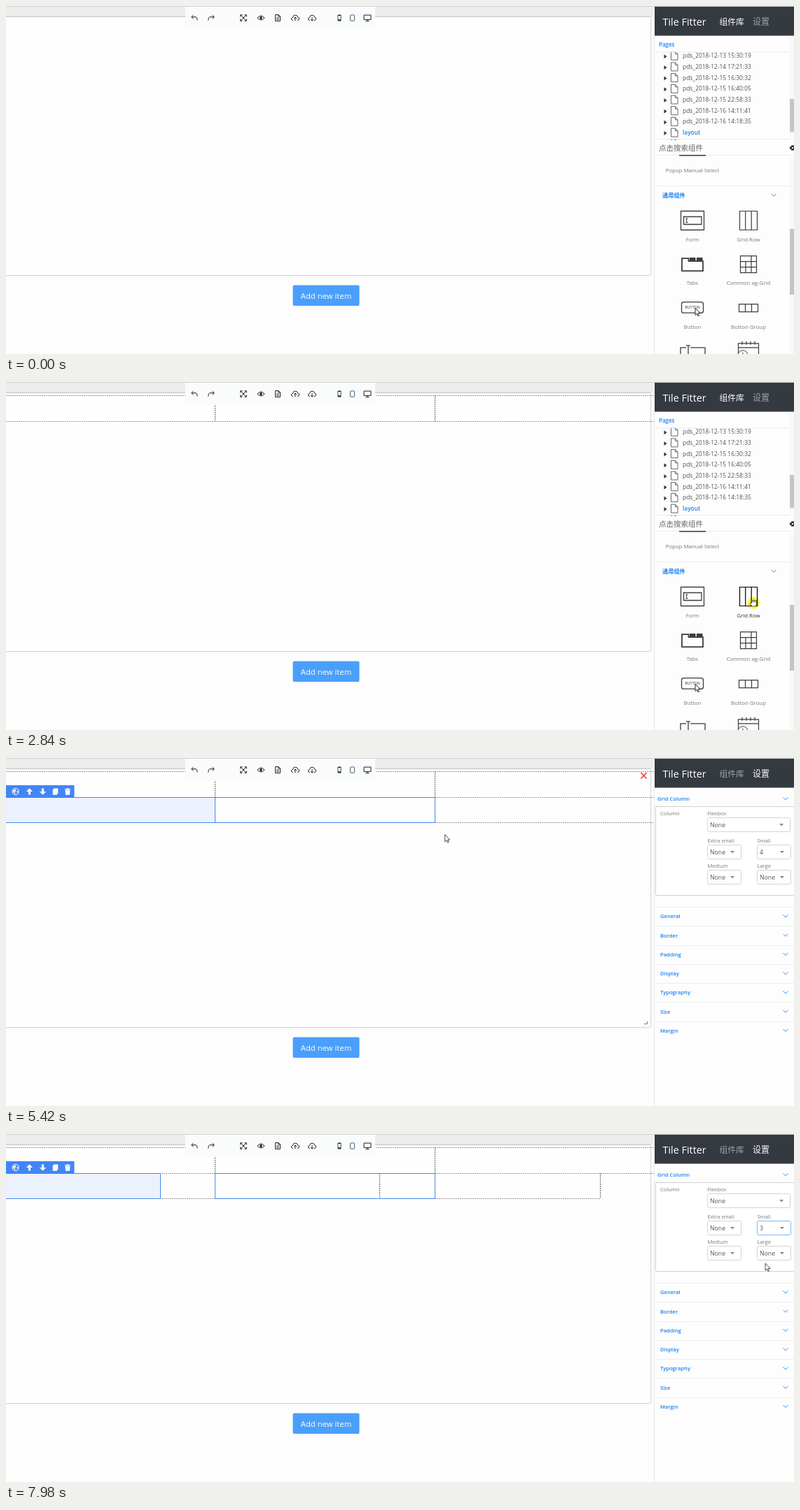
Write an HTML page that moves like this. It is 1125 px wide and 498 px high and loops after 8 s.

```html
<!DOCTYPE html>
<html lang="zh">
<head>
<meta charset="utf-8">
<title>Page designer</title>
<style>
  html, body { margin: 0; width: 100%; height: 100%; overflow: hidden; background: #fdfdfd; }
  svg { display: block; }
  text { font-family: "Open Sans", "Noto Sans CJK SC", "Noto Sans CJK", sans-serif; }
  .line { fill: none; stroke: currentColor; }
  .dash { fill: none; stroke: #999; stroke-dasharray: 2 1; }
  .dash.v { stroke: #666; }
  .item { color: #3d3d3d; }
  .item text.label { fill: #777; }
  .item.on { color: #000; }
  .item.on text.label { fill: #333; }
  .page { filter: drop-shadow(0 0 1.2px rgba(0, 0, 0, .45)); }
  .halo { fill: #ffff50; mix-blend-mode: multiply; }
</style>
</head>
<body>
<svg id="stage" width="1125" height="498" viewBox="0 0 1125 498"></svg>
<script>
const LOOP = 8000, BLUE = '#1a80f5';
const stage = document.getElementById('stage');

// ---- markup helpers ----
const text = (x, y, s, size, fill, more = '') =>
  `<text x="${x}" y="${y + size * .36}" font-size="${size}" fill="${fill}" ${more}>${s}</text>`;
const rect = (x, y, w, h, fill, more = '') =>
  `<rect x="${x}" y="${y}" width="${w}" height="${h}" fill="${fill}" ${more}/>`;
const path = (d, more = 'class="line"') => `<path d="${d}" ${more}/>`;
const at = (x, y, body, more = '') => `<g transform="translate(${x} ${y})" ${more}>${body}</g>`;
const rule = (y, x2 = 1119) => rect(926, y, x2 - 926, 1, '#ececec');
const chevron = (x, y) => path(`M${x - 3.5} ${y - 1.7}l3.5 3.5 3.5-3.5`, `fill="none" stroke="${BLUE}" stroke-width=".9"`);
const BOLD = 'font-weight="600"', MID = 'text-anchor="middle"';
const ARROW = 'M0 0V10.2L2.4 8 3.9 11.5 5.5 10.8 4 7.4H7Z';
const HAND = 'M-1 .8Q0-.8 1 .8V5.6Q2.6 4.7 3 6.1 4.6 5.5 5 6.7 6.7 6.3 6.9 7.8V10.4L5.6 13.6H.6L-3 9.2Q-2.8 7.4-1 8.7Z';
const GRAB = 'M-2.6.4V-3Q-2-4.4-1-3.2-.2-5 .9-3.6 2-4.8 2.8-3.2 4.6-3.8 4.6-1.8V1.8L3.2 5H-1.8L-5 1Q-4.4-.8-2.6.4ZM-1-3V-.6M.9-3.4V-.6M2.8-3V-.6';

// ---- top toolbar ----
const cloud = d => path(`M-3 3.5H-3.5Q-6 3-5.5 1-5-.5-3.5-.7-3-4 .3-4 3-4 3.6-1 6-.5 5.7 1.7 5.4 3.4 3 3.5M0 4.2V-.8${d}`);
const tools = [
  [269, path('M-1.5-4L-4.2-1.3-1.5 1.4M-4-1.3H2Q4.5-.8 4.2 3.5')],
  [293, path('M1.5-4L4.2-1.3 1.5 1.4M4-1.3H-2Q-4.5-.8-4.2 3.5')],
  [339, path('M-4-4L4 4M-4 4L4-4M-4.3-1.5V-4.3H-1.5M1.5-4.3H4.3V-1.5M4.3 1.5V4.3H1.5M-1.5 4.3H-4.3V1.5')],
  [364, path('M-5 0Q0-6 5 0 0 6-5 0Z') + '<circle r="1.9"/>'],
  [388, path('M-3.5-4.5H1.2L3.5-2.2V4.5H-3.5ZM1-4.5V-2H3.5M-2 0H2M-2 2.3H2')],
  [413, cloud('M-2 1L0-1 2 1')],
  [437, cloud('M-2 2.2L0 4.3 2 2.2')],
  [476, rect(-2.5, -4.5, 5, 9, '#222', 'rx="1"') + rect(-1.7, -3, 3.4, 5.3, '#fff')],
  [494.5, rect(-3, -4.2, 6, 8.4, '#fff', 'rx="1" stroke="#2c4d6e" stroke-width=".9"')],
  [516, path('M-5-4H5V2.5H-5ZM0 2.5V4.5M-2.5 4.7H2.5')],
].map(([x, icon]) => at(x, 17, icon, 'color="#222" fill="#222"')).join('');

const cellTools = rect(0, 39, 97.5, 18, '#4285f4', 'rx="1"') + [
  [13.5, '<circle r="4.7" fill="none" stroke="#fff"/><path d="M-3.8-1.5L-.5-3.5 1-1-1 .2 0 3.5-2.5 2ZM1.6 0L3.8-1.5 3 2.5Z"/>'],
  [33.5, path('M0-4.8L4.6 0H1.6V4.5H-1.6V0H-4.6Z', '')],
  [52.5, path('M0 4.8L4.6 0H1.6V-4.5H-1.6V0H-4.6Z', '')],
  [70.5, path('M-2.5-4.5H3.8V3H2.5V4.7H-3.8V-3H-2.5Z', '')],
  [88, path('M-4.2-3.8H-1.5V-4.8H1.5V-3.8H4.2V-2.6H-4.2ZM-3.5-2H3.5L3 4.8H-3Z', '')],
].map(([x, icon]) => at(x, 48, icon, 'fill="#fff"')).join('');

// ---- component library ----
const stamps = ['13 15:30:19', '14 17:21:33', '15 16:30:32', '15 16:40:05', '15 22:58:33', '16 14:11:41', '16 14:18:35'];
const pageNames = [...stamps.map(s => 'pds_2018-12-' + s), 'layout', ''];
const tree = pageNames.map((name, i) => {
  const y = 71.2 + i * 15.7, last = name === 'layout';
  return path(`M939.5 ${y - 2}l4 3-4 3Z`, 'fill="#333"') +
    path(`M949.5 ${y - 6}h6l3.5 3.5v8.5h-9.5ZM955.5 ${y - 6}v3.5h3.5`, 'fill="#fff" stroke="#555" stroke-width=".9"') +
    text(966, y, name, last ? 8.3 : 8.45, last ? BLUE : '#555', last ? BOLD : '');
}).join('');

const items = [
  [0, 0, 'Form', path('M-16.5-13.5H16.5V13.5H-16.5ZM-12.5-5.5H13V5.5H-12.5Z', 'class="line" stroke-width="1.3" stroke-linejoin="round"') + path('M-10-2.8H-6.5M-8.2-2.8V2.8M-10 2.8H-6.5')],
  [1, 0, 'Grid Row', path('M-12.5-13.5H12.5V13.5H-12.5ZM-4.3-13.5V13.5M4.2-13.5V13.5', 'class="line" stroke-width="1.2"')],
  [0, 1, 'Tabs', path('M-15-8.5H-5.5V-4.5H15V9.5H-15Z', 'class="line" stroke-width="1.8"') + path('M-4-9.5H4.5V-4H-4ZM6-9.5H14.5V-4H6Z', 'fill="currentColor"')],
  [1, 1, 'Common ag-Grid', path('M-11.5-12H11.5V12H-11.5ZM-11.5-4H11.5M-11.5 4H11.5M-4-4V12M4-12V12', 'class="line" stroke-width="1.2"')],
  [0, 2, 'Button', '<rect x="-15.5" y="-8.5" width="31" height="15.5" rx="3" class="line" stroke-width="1.3"/>' + text(0, -1.5, 'BUTTON', 5.4, '#333', MID) + at(4, 0, path(ARROW, 'fill="#fff" stroke="#222"'))],
  [1, 2, 'Button Group', path('M-13.5-5.5H13.5V5.5H-13.5ZM-4.5-5.5V5.5M4.5-5.5V5.5', 'class="line" stroke-width="1.2"')],
  [0, 3, '', path('M-9-6H-17V12H18V-6H-3M-9-9H-3M-6-9V12', 'class="line" stroke-width="1.3"')],
  [1, 3, '', path('M-14.5-12H14.5V12H-14.5ZM-14.5-6H14.5M-9-15V-10M-3-15V-10M3-15V-10M9-15V-10', 'class="line" stroke-width="1.2"') +
    '<circle cx="-8" cy="5" r="7" fill="#fdfdfd" stroke="currentColor"/>' + path('M-8 1V5H-5')],
];
const library = tree + rect(926, 43, 199, 22.5, '#fdfdfd') + rect(926, 192, 199, 306, '#fdfdfd') +
  text(932, 55, 'Pages', 8, BLUE, BOLD) + rule(65.5) + rule(190) + rule(213) + rule(257) +
  text(932, 203, '点击搜索组件', 10.5, '#666') +
  path('M1118.5 203l3-3.5h4v7h-4Z', 'fill="#222"') + path('M1121.5 201.5l3 3m0-3l-3 3', 'stroke="#fff"') +
  rect(961, 213, 38, 1.6, '#444') + text(980, 235.5, 'Popup Manual Select', 7.8, '#777', MID) +
  text(937, 271, '通用组件', 8.2, BLUE, 'font-weight="700"') + chevron(1096, 270.5) +
  items.map(([c, r, name, icon]) =>
    at(980 + c * 80, 307 + r * 62.6, icon + text(0, 27, name, 7.8, '', 'class="label" text-anchor="middle"'), 'class="item"')).join('') +
  rect(1119, 43, 6, 147, '#f8f8f8') + rect(1119, 214, 6, 284, '#f8f8f8') +
  rect(1119, 133, 6, 47, '#c4c4c4') + rect(1119, 319, 6, 94, '#c4c4c4');

// ---- settings ----
const select = (x, y, w, label, value, id = '') =>
  text(x + .5, y - 7, label, 7.5, '#777') +
  rect(x + .5, y - .5, w, 20, '#fff', `rx="2" stroke="#d4d4d4" ${id && `id="${id}Box"`}`) +
  text(x + 4, y + 10, value, 8.7, '#555', id && `id="${id}"`) +
  path(`M${x + w - 15} ${y + 8}h6l-3 3.3Z`, 'fill="#888"');
const settings = text(930, 58, 'Grid Column', 7.6, BLUE, BOLD) + chevron(1113, 58) +
  path('M1126 69.5H929Q927.5 69.5 927.5 71V195Q927.5 196.5 929 196.5H1126', 'fill="#fff" stroke="#d0d0d0"') +
  text(934, 79, 'Column', 7.6, '#777') +
  select(1001, 86, 118, 'Flexbox', 'None') + select(1001, 125, 48, 'Extra small', 'None') +
  select(1072, 125, 48, 'Small', '4', 'small') + select(1001, 161, 48, 'Medium', 'None') +
  select(1072, 161, 48, 'Large', 'None') +
  ['General', 'Border', 'Padding', 'Display', 'Typography', 'Size', 'Margin'].map((s, i) => {
    const y = 226.7 + i * 27.25;
    return rule(Math.round(y - 13.7), 1125) + text(934, y, s, 7.6, BLUE, BOLD) + chevron(1113, y - .5);
  }).join('');

stage.innerHTML = rect(0, 0, 1125, 498, '#fdfdfd') +
  rect(0, 0, 926, 16, '#ededed') + rect(0, 0, 1125, 1, '#d2d2d2') +
  rect(-5, 16, 925, 369, '#fefefe', 'class="page"') +
  '<g id="grid"></g>' +
  rect(256, 1, 271, 31.5, '#fafbfb') + tools + `<g id="cellTools">${cellTools}</g>` +
  rect(409.5, 399.5, 95, 29.5, '#4a9ffb', 'rx="2"') + text(457, 414.7, 'Add new item', 11.3, '#fff', MID) +
  rect(925, 1, 200, 497, '#fdfdfd') + rect(925, 42, 1, 456, '#e6e6e6') +
  `<g id="library">${library}</g><g id="settings">${settings}</g>` +
  rect(926, 1, 199, 41.5, '#343a40') + text(937.5, 23, 'Tile Fitter', 14.4, '#fff') +
  text(1018.5, 22.7, '组件库', 11.8, '#fff', 'id="tabLib"') + text(1066, 22.7, '设置', 12, '#fff', 'id="tabSet"') +
  '<g id="over"></g>';

const el = id => document.getElementById(id);
const itemEls = [...document.querySelectorAll('.item')];

// ---- pointer motion: start, end, steps, points along the way ----
const moves = [
  [150, 900, 11, [[1060, 515], [1062, 400], [1067, 316]]],
  [990, 1530, 8, [[1067, 316], [930, 271], [772, 210], [615, 150], [550, 127]]],
  [2070, 2840, 11, [[550, 127], [820, 230], [1067, 316]]],
  [3010, 3540, 8, [[1067, 316], [835, 240], [680, 198], [546, 161]]],
  [3790, 4170, 6, [[546, 161], [246, 69]]],
  [5120, 5730, 9, [[246, 69], [540, 97], [800, 135], [1030, 140]]],
  [5960, 6420, 7, [[1112, 168], [1096, 132]]],
  [6820, 7510, 10, [[1096, 132], [1084, 185]]],
];
function along(pts, u) {
  const s = u * (pts.length - 1), i = Math.min(Math.floor(s), pts.length - 2), f = s - i;
  return [0, 1].map(k => pts[i][k] + (pts[i + 1][k] - pts[i][k]) * f);
}
function pointer(t) {
  const move = moves.filter(m => m[0] <= t).pop();
  if (!move) return null;
  const [start, end, n, pts] = move;
  const step = Math.floor((t - start) / (end - start) * (n - 1) + .01) + 1;
  const u = Math.min(1, step / n);
  return { tip: along(pts, u), lag: along(pts, u < 1 ? Math.max(0, u - .058) : 1) };
}
const within = (t, ...spans) => spans.some(([a, b]) => t >= a && t < b);

// ---- layout grid ----
const row = (y, h, right, cols) => path(`M0 ${y}.5H${right}M0 ${y + h}.5H${right}`, 'class="dash"') +
  cols.map(x => path(`M${x}.5 ${y}V${y + h}`, 'class="dash v"')).join('');
const cellBox = (x, w, fill = 'none') => rect(x - .5, 56.5, w, 36, fill, 'stroke="#4285f4" opacity=".95"');

function drawGrid(t, p) {
  const narrow = t >= 7890, chosen = t >= 4870;
  let s = '';
  if (t >= 1680) s += row(19, 37, 925, [298, 612]);
  if (t >= 3620) s += narrow ? row(56, 36, 848, [220, 533, 848]) : row(56, 36, 925, [298, 612]);
  if (chosen) s += cellBox(0, narrow ? 221 : 299, '#ebf2fe');
  if (t >= 3620 && p) {
    const [x, y] = p.tip, inRow = y > 57 && y < 93;
    if (inRow && x < 299 && !chosen) s += cellBox(0, 299);
    if (inRow && x >= 299 && x < 613 || t >= 5300) s += cellBox(299, 314);
  }
  return s;
}

function drawOver(t, p) {
  let s = '';
  const active = within(t, [1760, 2560], [3620, 5540]);
  if (active) s += path('M906.5 21l8 8.5m0-8.5l-8 8.5', 'stroke="#ea4238" stroke-width="1.7"') +
    path('M915.5 377V380.5H911', 'fill="none" stroke="#777"');
  if (within(t, [6590, 7810])) {
    const h = 162 / 13, y = p.tip[1], hot = y > 146 ? Math.floor((y - 146) / h) : 4;
    s += rect(1072.5, 146, 47, 162, '#fff', 'stroke="#999"');
    for (let i = 0; i < 13; i++) {
      if (i === hot) s += rect(1073, 146 + i * h, 46, h, '#1e90ff');
      s += text(1076, 146 + (i + .5) * h, i || 'None', 8.5, i === hot ? '#fff' : '#555');
    }
  }
  if (!p || within(t, [5730, 5960])) return s;
  const [x, y] = p.tip, dragging = within(t, [990, 1680], [3010, 3620]);
  if (dragging) s += at(Math.round(p.lag[0] - 26) + .5, Math.round(p.lag[1] - 15) + .5,
    path('M0 0H70V36H0Z', 'class="dash"') + path('M23 0V36M47 0V36', 'class="dash v"'));
  if (within(t, [900, 1680], [2840, 3545], [4640, 4800], [6430, 6590]))
    s += `<circle class="halo" cx="${x}" cy="${y}" r="9"/>`;
  const overPanel = x > 926 && t < 4800, overCell = t >= 3620 && y < 93 && x < 925;
  const shape = overCell || overPanel && dragging ? HAND : overPanel ? GRAB : ARROW;
  return s + at(x, y, path(shape, 'fill="#fff" stroke="#222" stroke-width=".8"'));
}

function draw(t) {
  const p = pointer(t), chosen = t >= 4870;
  el('grid').innerHTML = drawGrid(t, p);
  el('over').innerHTML = drawOver(t, p);
  el('library').style.display = chosen ? 'none' : '';
  for (const id of ['settings', 'cellTools']) el(id).style.display = chosen ? '' : 'none';
  el('tabLib').setAttribute('fill', chosen ? '#a0a3a6' : '#fff');
  el('tabSet').setAttribute('fill', chosen ? '#fff' : '#a0a3a6');
  el('small').textContent = t >= 7810 ? '3' : '4';
  el('smallBox').setAttribute('stroke', t >= 6590 ? '#7ab8fa' : '#d4d4d4');
  items.forEach(([c, r], i) => {
    const dx = p ? p.lag[0] - 940 - c * 80 : -1, dy = p ? p.lag[1] - 280 - r * 62.6 : -1;
    itemEls[i].classList.toggle('on', dx > 0 && dx < 80 && dy > 0 && dy < 62.6);
  });
}

let begin;
function tick(now) {
  begin ??= now;
  draw((now - begin) % LOOP);
  requestAnimationFrame(tick);
}
draw(0);
requestAnimationFrame(tick);
</script>
</body>
</html>
```
